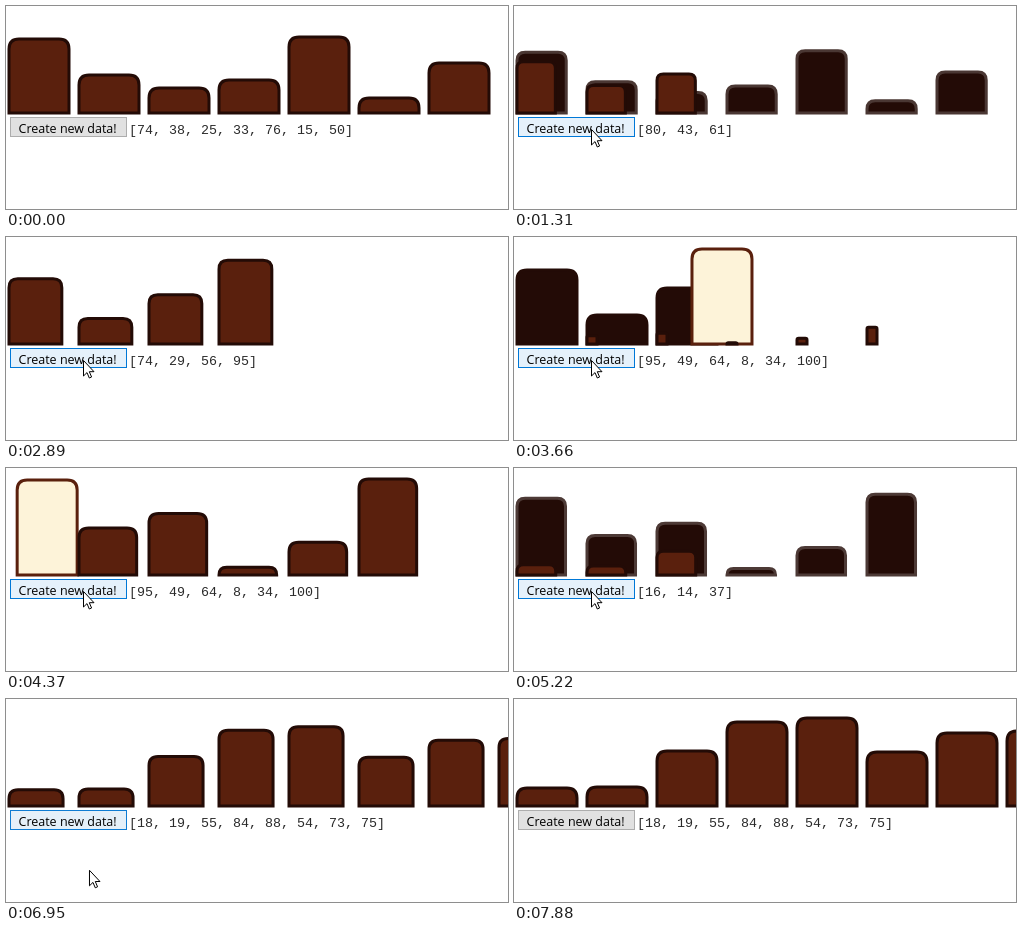
Recreate the animation shown at these times as an HTML page. Size 502 by 203 pixels, loop 7.96 s.

```html
<!DOCTYPE html>
<html lang="en">
<head>
<meta charset="utf-8">
<title>Bar chart transitions</title>
<style>
  html, body { margin: 0; width: 100%; height: 100%; overflow: hidden; background: #fff; }
  svg { display: block; }
  .label { font: 12.5px "Open Sans", "Noto Sans", sans-serif; }
  .code { font: 13.333px "Liberation Mono", monospace; fill: #2a2a2a; white-space: pre; }
</style>
</head>
<body>
<svg id="stage" width="502" height="203" viewBox="0 0 502 203"></svg>
<script>
const LOOP = 7960, BASE = 107, PITCH = 70, WIDTH = 60;
const ENTER_MS = 1000, EXIT_MS = 650, PRESS_MS = 80;
const DARK = [35, 11, 6], BROWN = [90, 32, 13], CREAM = [253, 243, 217], WHITE = [255, 255, 255];

const sets = [
  [74, 38, 25, 33, 76, 15, 50],
  [80, 43, 61],
  [74, 29, 56, 95],
  [95, 49, 64, 8, 34, 100],
  [16, 14, 37],
  [18, 19, 55, 84, 88, 54, 73, 75]
];
const clicks = [1080, 2365, 3647, 4985, 6385];

const stage = document.getElementById("stage");
const ramp = (t, from, ms) => Math.min(1, Math.max(0, (t - from) / ms));
const lerp = (a, b, p) => a + (b - a) * p;
const mix = (a, b, p) => a.map((v, i) => lerp(v, b[i], p));
const rgb = c => `rgb(${c.map(Math.round)})`;
const circleOut = u => Math.sqrt(1 - (1 - u) ** 2);
const cubicInOut = u => u < .5 ? 4 * u ** 3 : 1 - 4 * (1 - u) ** 3;
const barX = i => 3 + i * PITCH;

function bar(x, value, scale, fill, stroke) {
  const w = WIDTH * scale, h = value * scale, r = Math.min(w / 6, h), y = BASE - h;
  return `<path d="M${x} ${BASE}V${y + r}Q${x} ${y} ${x + r} ${y}H${x + w - r}` +
    `Q${x + w} ${y} ${x + w} ${y + r}V${BASE}Z" fill="${rgb(fill)}" stroke="${rgb(stroke)}" stroke-width="3"/>`;
}

function chart(t) {
  const step = clicks.filter(c => c <= t).length;
  const now = sets[step], old = step ? sets[step - 1] : [];
  const age = step ? t - clicks[step - 1] : LOOP;
  const grow = circleOut(ramp(age, 0, ENTER_MS));
  const gone = cubicInOut(ramp(age, 0, EXIT_MS));
  let exits = "", moves = "", enters = "";

  old.forEach((v, i) => {
    if (gone < 1 && !now.includes(v)) exits += bar(barX(i), v, 1 - gone, DARK, mix(DARK, WHITE, gone));
  });
  now.forEach((v, i) => {
    const from = old.indexOf(v);
    if (from < 0) enters += bar(barX(i), v, grow, BROWN, DARK);
    else moves += bar(lerp(barX(from), barX(i), grow), v, 1, CREAM, BROWN);
  });
  return exits + moves + enters +
    `<text class="code" x="123" y="127.5">[${now.join(", ")}]</text>`;
}

const isPressed = t => clicks.some((c, i) => i && t >= c - PRESS_MS && t < c);

function button(t) {
  const hover = ramp(t, 560, 150) - ramp(t, 6930, 250);
  const down = isPressed(t);
  const fill = down ? [204, 228, 247] : mix([225, 225, 225], [229, 241, 251], hover);
  const edge = down ? [0, 84, 153] : mix([173, 173, 173], [0, 120, 215], hover);
  return `<rect x="4.5" y="111.5" width="116" height="19" fill="${rgb(fill)}" stroke="${rgb(edge)}"/>` +
    `<text class="label" x="12.5" y="127">Create new data!</text>`;
}

function pointer(t) {
  if (t < 440 || t > 7010) return "";
  const arrive = 1 - (1 - ramp(t, 420, 360)) ** 2;
  const leave = ramp(t, 6750, 260) ** 2;
  const x = 77 + 8 * (1 - arrive) + 10 * leave;
  const y = 123 + 75 * (1 - arrive) + 80 * leave;
  const glow = isPressed(t) ? `<circle r="11" fill="#e8e428" fill-opacity=".62"/>` : "";
  return `<g transform="translate(${x} ${y})">${glow}` +
    `<path d="M.5 .5V16L4 12.6 6.3 18 8.6 17 6.3 11.7H11Z" fill="#fff" stroke="#000"/></g>`;
}

function draw(ms) {
  const t = ms % LOOP;
  stage.innerHTML = chart(t) + button(t) + pointer(t);
}

const start = performance.now();
function tick() {
  draw(performance.now() - start);
  requestAnimationFrame(tick);
}
tick();
</script>
</body>
</html>
```
